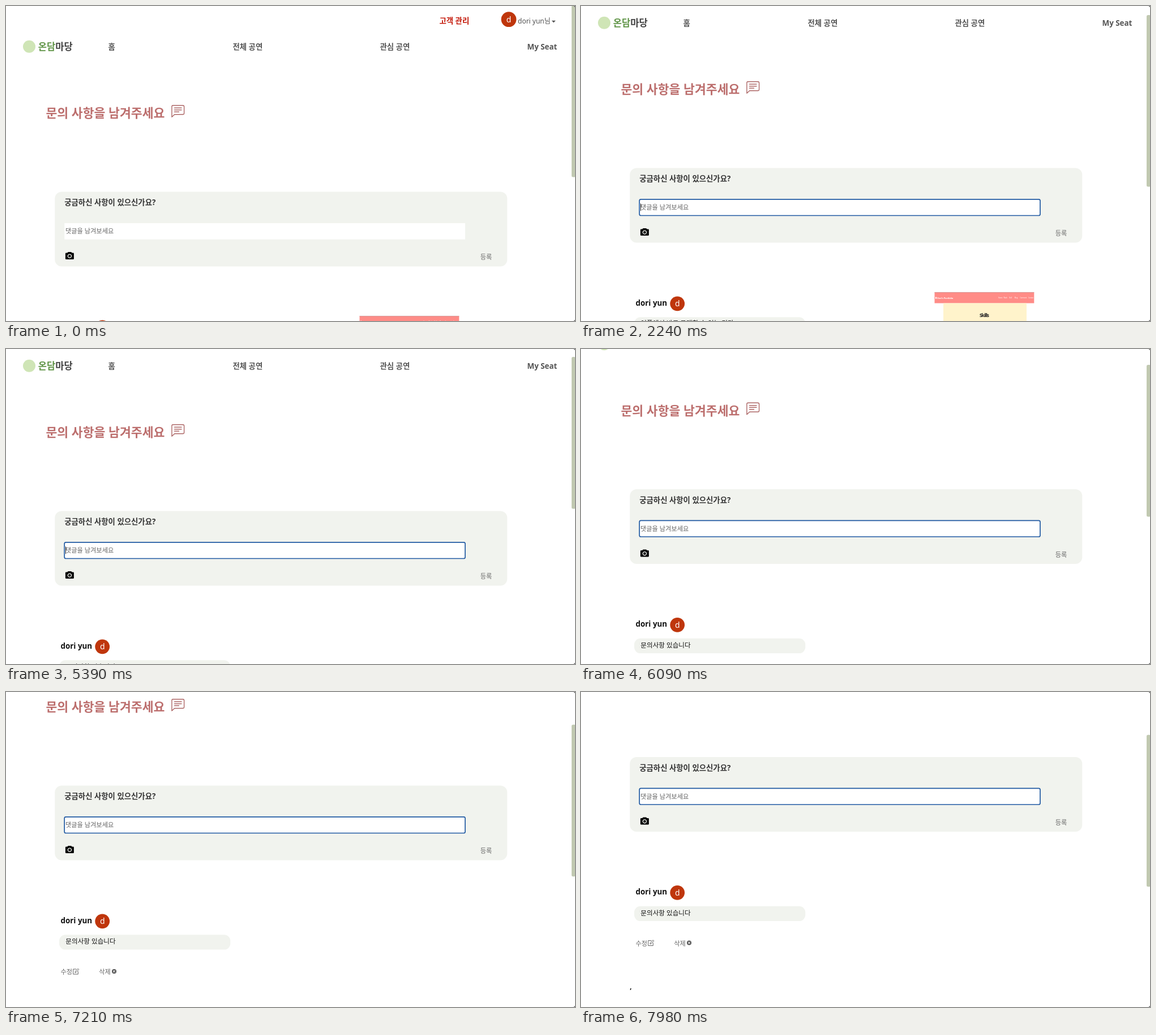
Recreate the animation shown at these times as an HTML page. Size 1005 by 557 pixels, loop 8000 ms.

```html
<!DOCTYPE html>
<html lang="ko">
<head>
<meta charset="utf-8">
<title>문의 사항</title>
<style>
  html, body { margin: 0; width: 100%; height: 100%; overflow: hidden; background: #fff; }
  svg { display: block; width: 1005px; height: 557px; }
  text { font-family: "Noto Sans", "Noto Sans CJK KR", "Noto Sans CJK", sans-serif; font-size: 11.2px; fill: #666; white-space: pre; }
  .nav { font-size: 13.4px; font-weight: 600; fill: #555; }
  .logo { font-size: 16.6px; font-weight: 900; fill: #444; }
  .title { font-size: 21.6px; font-weight: 700; fill: #bc6e6d; }
  .ask { font-size: 13.4px; font-weight: 600; fill: #333; }
  .name { font-size: 13.4px; font-weight: 600; fill: #111; }
  .body { font-size: 11.6px; font-weight: 500; fill: #111; }
  .initial { font-size: 14px; font-weight: 500; fill: #fff; text-anchor: middle; }
  .tiny text { font-size: 2.6px; fill: #fff; }
  .tiny .brand { font-size: 4.2px; font-weight: 600; letter-spacing: -.2px; }
  .tiny .head { font-size: 8.4px; font-weight: 700; letter-spacing: -.9px; fill: #222; text-anchor: middle; }
  .line { fill: none; stroke-linecap: round; stroke-linejoin: round; }
</style>
</head>
<body>
<svg viewBox="0 0 1005 557">
  <g id="page">
    <text class="nav" x="765.5" y="31.3" style="fill:#c41808">고객 관리</text>
    <circle cx="888" cy="23.7" r="13.4" fill="#bf360c"/>
    <text class="initial" x="888" y="28.8">d</text>
    <text x="904" y="31" style="font-size:12px;fill:#555">dori yun님</text>
    <path d="M963.8 25.8h7l-3.5 3.8z" fill="#555"/>

    <circle cx="41" cy="71.7" r="11" fill="#cfe5b6"/>
    <text class="logo" x="56.8" y="78"><tspan fill="#5f9446">온담</tspan>마당</text>
    <text class="nav" x="180.5" y="76.7">홈</text>
    <text class="nav" x="400.5" y="76.7">전체 공연</text>
    <text class="nav" x="660.5" y="76.7">관심 공연</text>
    <text class="nav" x="920.5" y="76.5">My Seat</text>

    <text class="title" x="70.5" y="197">문의 사항을 남겨주세요</text>
    <path class="line" stroke="#ad6766" stroke-width="1.4"
      d="M294.8 175.7h17.6q2.2 0 2.2 2.2v11.6q0 2.2-2.2 2.2h-14.6l-4.9 4.6v-18.4q0-2.2 1.9-2.2zM297.5 180.3h12.5M297.5 183.8h12.5M297.5 187.3h8"/>

    <rect x="86.3" y="328.6" width="799" height="132" rx="12" fill="#f1f3ee"/>
    <text class="ask" x="103.2" y="352.4">궁금하신 사항이 있으신가요?</text>
    <rect x="103.3" y="384" width="707.7" height="28.7" fill="#fff"/>
    <rect id="ring" x="103.2" y="383.8" width="707.8" height="28.7" rx="2.5" fill="#fff" stroke="#2059a2" stroke-width="1.7"/>
    <text id="hint" x="105" y="402">댓글을 남겨보세요</text>
    <text id="typed" x="105" y="402" style="fill:#222"></text>
    <path id="caret" d="M0 391.3v13" stroke="#222" stroke-width="1"/>
    <path fill="#000" fill-rule="evenodd"
      d="M109.7 435h5.4l1.4 1.6h2q1.4 0 1.4 1.4v8.7q0 1.4-1.4 1.4h-12.2q-1.4 0-1.4-1.4v-8.7q0-1.4 1.4-1.4h2zM112.4 438.4a3.8 3.8 0 1 0 .01 0zM112.4 439.8a2.4 2.4 0 1 1-.01 0z"/>
    <text x="837.8" y="448">등록</text>

    <text class="name" x="96.5" y="571.8">dori yun</text>
    <circle cx="170.2" cy="568.3" r="12.9" fill="#bf360c"/>
    <text class="initial" x="170.2" y="573.4">d</text>
    <rect x="94" y="592.3" width="302.3" height="26.3" rx="11" fill="#f1f3ee"/>
    <text class="body" id="comment" x="105.3" y="608.3"></text>

    <g id="photo" class="tiny">
      <rect x="624.5" y="548" width="175.8" height="19.5" fill="#ff8c87"/>
      <path d="M624.5 548.4h175.8" stroke="#c99" stroke-width=".8"/>
      <rect x="640" y="567.5" width="147" height="80" fill="#fff3cb"/>
      <rect x="626" y="556.6" width="2" height="3" fill="#fff"/>
      <text class="brand" x="629" y="559.8">Dori's Portfolio</text>
      <g id="links"></g>
      <text class="head" x="712" y="592">Skills</text>
    </g>

    <g id="tools">
      <text x="96.5" y="662">수정</text>
      <path class="line" stroke="#666" stroke-width="1" d="M124 653h-5.3v9h8.6v-4.8M122 659l.6-2.2 4.6-4.7 1.5 1.5-4.6 4.7z"/>
      <text x="164.3" y="662">삭제</text>
      <circle cx="191" cy="657" r="4" fill="#555"/>
      <path class="line" stroke="#fff" stroke-width="1.1" d="M189.6 655.6l2.8 2.8m0-2.8l-2.8 2.8"/>
      <text class="body" x="86.2" y="738" style="font-weight:600">,</text>
    </g>
  </g>
  <rect id="thumb" x="999" width="7" rx="2.5" fill="#c1c9b1"/>
  <path d="M1002.6 0H1005V2.2zM1005 554.8V557h-2.4z" fill="#666"/>
</svg>
<script>
const LOOP = 8000, STEP = 70, FOCUS = 2240, POST = 5390;
const $ = id => document.getElementById(id);

// Each run: start time, then one scroll offset per step.
const scrollRuns = [
  [0, 0, 1.5, 4],
  [490, 8, 15, 23, 31, 37, 40.5, 42],
  [5810, 43.5, 49, 57.5, 68, 80.5, 108, 129, 137.5],
  [6790, 138.5, 140, 141.5, 145, 150, 156, 163, 169, 175, 181, 188, 195],
  [7630, 201, 207, 211.5, 213.5]
];
const scrolls = scrollRuns.flatMap(([start, ...ys]) => ys.map((y, i) => [start + i * STEP, y]));

const typing = [
  [0, ""], [2660, "ㅁ"], [2800, "무"], [3010, "문"],
  [3570, "문ㅇ"], [3640, "문으"], [3710, "문의"],
  [3850, "문의ㅅ"], [3920, "문의사"],
  [4060, "문의사ㅎ"], [4130, "문의사하"], [4340, "문의사항 "],
  [4410, "문의사항 ㅇ"], [4480, "문의사항 이"], [4550, "문의사항 있"],
  [4760, "문의사항 있ㅅ"], [4830, "문의사항 있스"], [4900, "문의사항 있습"],
  [5040, "문의사항 있습ㄴ"], [5110, "문의사항 있습니"],
  [5250, "문의사항 있습니ㄷ"], [5320, "문의사항 있습니다"], [POST, ""]
];
const blink = [[0, false], [FOCUS, true], [5950, false], [6440, true], [6930, false], [7490, true], [7980, false]];

const at = (steps, t) => {
  let value = steps[0][1];
  for (const [time, v] of steps) if (time <= t) value = v;
  return value;
};
const show = (id, on) => { $(id).style.display = on ? "" : "none"; };
const setText = (id, s) => { if ($(id).textContent !== s) $(id).textContent = s; };

$("links").innerHTML = ["Home", "Work", "Skill", "Blog", "Comment", "Contact"]
  .map((word, i) => `<text x="${737 + i * 9.6 + (i > 4 ? 5 : 0)}" y="559">${word}</text>`).join("");

function draw(t) {
  const y = at(scrolls, t), text = at(typing, t), posted = t >= POST;
  $("page").setAttribute("transform", `translate(0 ${-y})`);
  $("thumb").setAttribute("y", y * (posted ? .36 : .405) - 1);
  $("thumb").setAttribute("height", posted ? 268.5 : 303.5);

  show("ring", t >= FOCUS);
  show("hint", !text);
  setText("typed", text);
  show("caret", at(blink, t));
  const width = text ? $("typed").getComputedTextLength() : 0;
  $("caret").setAttribute("transform", `translate(${105.5 + width} 0)`);

  setText("comment", posted ? "문의사항 있습니다" : "어플에서 바로 구매할 수 있는 건가");
  $("comment").setAttribute("y", posted ? 608.3 : 606.8);
  show("photo", !posted);
  show("tools", posted);
}

const begin = performance.now();
function frame() {
  draw((performance.now() - begin) % LOOP);
  requestAnimationFrame(frame);
}
frame();
</script>
</body>
</html>
```
